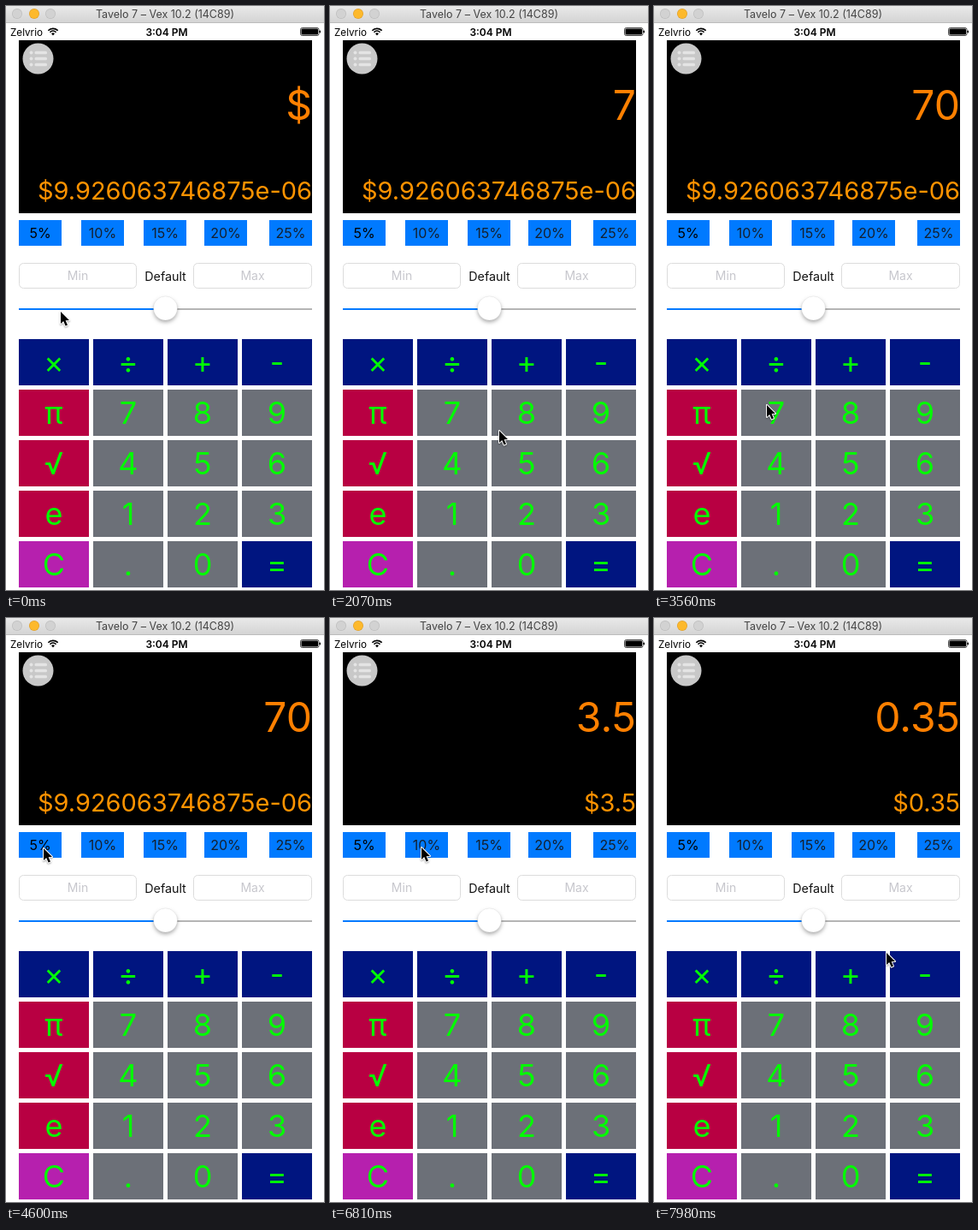
These frames come from a looping animation (372 by 682 pixels, 8 s). An HTML page with a canvas:

```html
<!DOCTYPE html>
<html lang="en">
<head>
<meta charset="utf-8">
<title>Tip calculator</title>
<style>
  html, body { margin: 0; width: 372px; height: 682px; overflow: hidden; background: #fff; }
  canvas { display: block; width: 372px; height: 682px; }
</style>
</head>
<body>
<canvas id="stage"></canvas>
<script>
const W = 372, H = 682, LOOP = 8000, TICK = 147.75;
const canvas = document.getElementById('stage');
const ctx = canvas.getContext('2d');
const ratio = window.devicePixelRatio || 1;
canvas.width = W * ratio;
canvas.height = H * ratio;

const BLUE = '#007aff', NAVY = '#001580', RED = '#b80042', GREY = '#6c7078', PURPLE = '#b620ae';
const FONT = 'Inter, Roboto, sans-serif';

const keyRows = ['×÷+-', 'π789', '√456', 'e123', 'C.0='];
const keyX = [15, 102, 189, 276];
const tips = { '5%': 15, '10%': 88, '15%': 161, '20%': 232, '25%': 308 };

// Pointer moves: first tick, last tick, destination x and y
const moves = [
  [0, 4, 221, 565], [4, 6, 136, 475], [10, 12, 194, 478], [13, 18, 231, 655],
  [19, 20, 229, 647], [20, 28, 35, 285], [28, 31, 44, 269], [35, 37, 57, 273],
  [38, 39, 72, 271], [39, 40, 113, 276], [41, 43, 91, 274], [44, 46, 107, 268],
  [50, 54, 272, 391]
];
const presses = { '7': 8, '0': 19, '5%': 33, '10%': 47 };
const readouts = [
  [0, '$', '$9.926063746875e-06'],
  [9, '7', '$9.926063746875e-06'],
  [20, '70', '$9.926063746875e-06'],
  [34, '3.5', '$3.5'],
  [48, '0.35', '$0.35']
];

function rect(x, y, w, h, color) {
  ctx.fillStyle = color;
  ctx.fillRect(x, y, w, h);
}

function disc(x, y, r, color) {
  ctx.fillStyle = color;
  ctx.beginPath();
  ctx.arc(x, y, r, 0, Math.PI * 2);
  ctx.fill();
}

function rounded(x, y, w, h, r) {
  ctx.beginPath();
  ctx.roundRect(x, y, w, h, r);
}

function text(str, x, y, size, color, align = 'center', weight = 400) {
  ctx.font = `${weight} ${size}px ${FONT}`;
  ctx.textAlign = align;
  ctx.fillStyle = color;
  ctx.fillText(str, x, y);
}

function labelAlpha(label, tick) {
  const age = tick - presses[label];
  return age === 0 ? 0.2 : age === 1 ? 0.5 : 1;
}

function pointerAt(tick) {
  let x = 64, y = 357;
  for (const [start, end, toX, toY] of moves) {
    if (tick <= start) break;
    const p = Math.min(1, (tick - start) / (end - start));
    const eased = p * p * (3 - 2 * p);
    x += (toX - x) * eased;
    y += (toY - y) * eased;
  }
  return [x, y];
}

function drawTitleBar() {
  const shade = ctx.createLinearGradient(0, 0, 0, 20);
  shade.addColorStop(0, '#e9e9e9');
  shade.addColorStop(1, '#d3d3d3');
  rect(0, 0, W, 20, shade);
  rect(0, 19, W, 1, '#bcbcbc');
  [[13, '#d2d2d2', '#bdbdbd'], [33, '#fdb92c', '#e0a02a'], [52, '#d2d2d2', '#bdbdbd']].forEach(([x, fill, line]) => {
    disc(x, 9, 6, line);
    disc(x, 9, 5.3, fill);
  });
  text('Tavelo 7 – Vex 10.2 (14C89)', 186, 14, 12.5, '#444');
}

function drawStatusBar() {
  text('Zelvrio', 5, 34.5, 11.7, '#000', 'left');
  text('3:04 PM', 188, 34.5, 12, '#000', 'center', 600);
  ctx.strokeStyle = '#000';
  ctx.lineWidth = 1.7;
  [4.8, 7.7].forEach(r => {
    ctx.beginPath();
    ctx.arc(55, 34, r, -Math.PI * 0.76, -Math.PI * 0.24);
    ctx.stroke();
  });
  ctx.fillStyle = '#000';
  ctx.beginPath();
  ctx.moveTo(55, 34.5);
  ctx.arc(55, 34, 2.6, -Math.PI * 0.76, -Math.PI * 0.24);
  ctx.fill();

  ctx.lineWidth = 0.7;
  rounded(344.5, 25.5, 21.5, 9, 2);
  ctx.stroke();
  rounded(345.5, 26.5, 19.5, 7, 1);
  ctx.fill();
  rounded(366.5, 28.5, 1.5, 3, 0.7);
  ctx.fill();
}

function drawDisplay(tick) {
  rect(15, 40, 343, 202, '#000');
  disc(37.5, 61.5, 18, '#c8c8c8');
  [54.5, 61.5, 68.5].forEach(y => {
    disc(29.5, y, 2, '#e4e4e4');
    rounded(33.5, y - 1.8, 14.5, 3.6, 1.5);
    ctx.fill();
  });
  const [, entry, total] = readouts.filter(r => r[0] <= tick).pop();
  text(entry, 358, 133, 48, '#ff8000', 'right');
  text(total, 358, 226, 29, '#ff9300', 'right');
}

function drawTips(tick) {
  for (const [label, x] of Object.entries(tips)) {
    rect(x, 250, 50, 30, BLUE);
    ctx.globalAlpha = labelAlpha(label, tick);
    text(label, x + 25, 271, 16, label === '5%' ? '#000' : '#14202e');
    ctx.globalAlpha = 1;
  }
}

function drawSlider() {
  ctx.strokeStyle = '#dcdcdc';
  ctx.lineWidth = 1;
  [[15, 138, 'Min'], [219, 139, 'Max']].forEach(([x, w, hint]) => {
    rounded(x + 0.5, 300.5, w - 1, 29, 5);
    ctx.stroke();
    text(hint, x + w / 2, 320, 14, '#c7c7cd');
  });
  text('Default', 186.5, 320.5, 14.3, '#111');

  rect(15, 353, 171, 2, BLUE);
  rect(186, 353, 172, 2, '#b5b5b5');
  ctx.save();
  ctx.shadowColor = 'rgba(0,0,0,0.3)';
  ctx.shadowBlur = 4 * ratio;
  ctx.shadowOffsetY = 2.5 * ratio;
  disc(186.5, 353, 14, '#fff');
  ctx.restore();
  ctx.strokeStyle = 'rgba(0,0,0,0.1)';
  ctx.lineWidth = 0.6;
  ctx.beginPath();
  ctx.arc(186.5, 353, 14, 0, Math.PI * 2);
  ctx.stroke();
}

function keyColor(label, column) {
  if ('×÷+-='.includes(label)) return NAVY;
  if (label === 'C') return PURPLE;
  return column === 0 ? RED : GREY;
}

function drawKeys(tick) {
  keyRows.forEach((row, r) => [...row].forEach((label, c) => {
    const x = keyX[c], y = 389 + r * 59;
    rect(x, y, 82, 54, keyColor(label, c));
    ctx.globalAlpha = labelAlpha(label, tick);
    text(label, x + 41, y + 40, 36, '#00ff00');
    ctx.globalAlpha = 1;
  }));
}

function drawPointer(tick) {
  const [x, y] = pointerAt(tick);
  ctx.save();
  ctx.translate(Math.round(x), Math.round(y));
  ctx.beginPath();
  [[0, 0], [0, 14], [3.2, 11], [5.6, 16.6], [8, 15.6], [5.6, 10.2], [10, 10]].forEach(p => ctx.lineTo(...p));
  ctx.closePath();
  ctx.shadowColor = 'rgba(0,0,0,0.35)';
  ctx.shadowBlur = 2 * ratio;
  ctx.shadowOffsetY = ratio;
  ctx.lineJoin = 'round';
  ctx.lineWidth = 2;
  ctx.strokeStyle = '#fff';
  ctx.stroke();
  ctx.shadowColor = 'transparent';
  ctx.fillStyle = '#000';
  ctx.fill();
  ctx.restore();
}

function draw() {
  const tick = Math.floor((performance.now() % LOOP) / TICK);
  ctx.setTransform(ratio, 0, 0, ratio, 0, 0);
  rect(0, 0, W, H, '#fff');
  drawTitleBar();
  drawStatusBar();
  drawDisplay(tick);
  drawTips(tick);
  drawSlider();
  drawKeys(tick);
  drawPointer(tick);
  requestAnimationFrame(draw);
}
draw();
</script>
</body>
</html>
```
